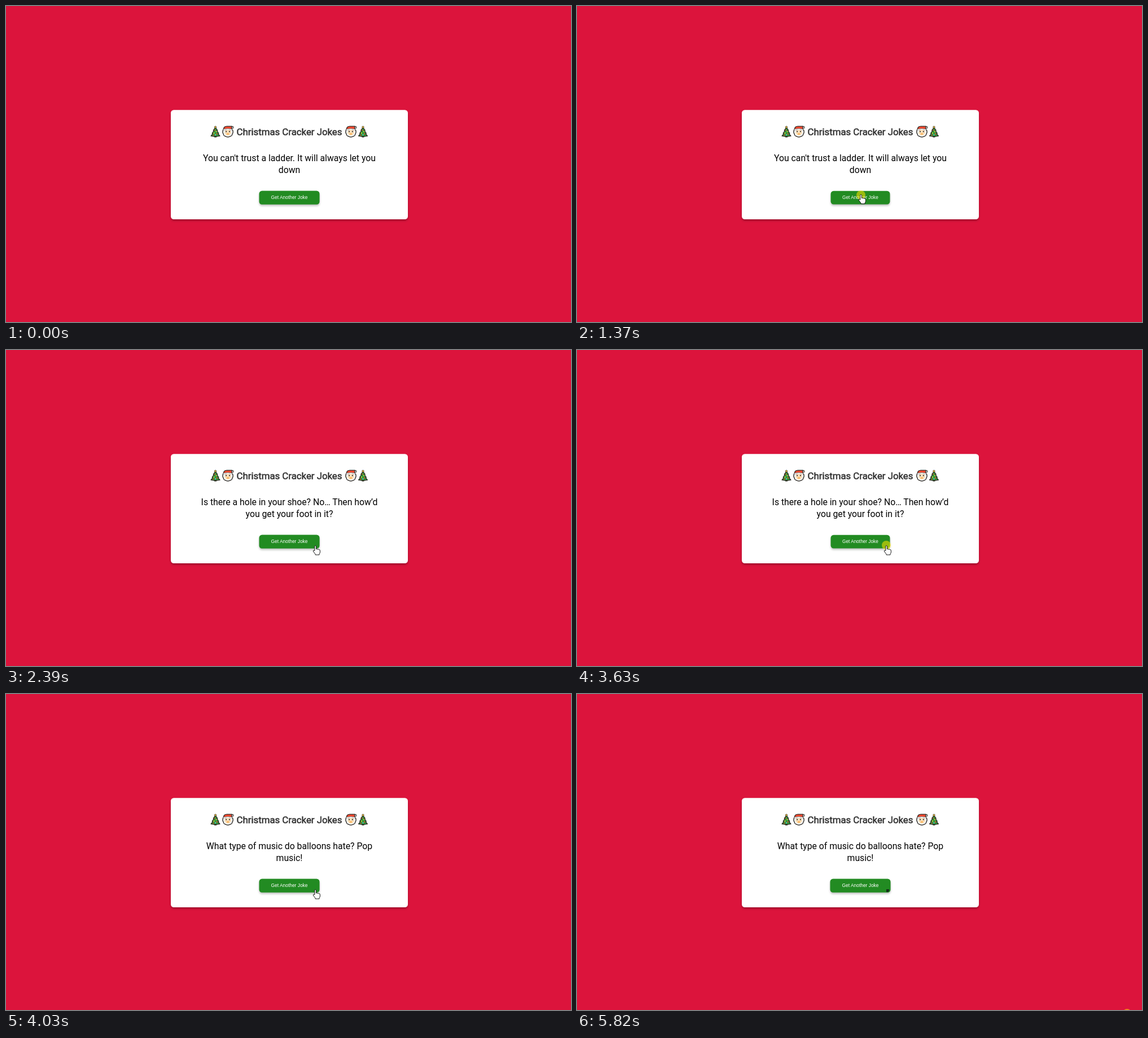
Recreate the animation shown at these times as an HTML page. Size 1001x560 px, loop 5.97 s.

```html
<!DOCTYPE html>
<html lang="en">
<head>
<meta charset="utf-8">
<title>Christmas Cracker Jokes</title>
<style>
html, body { margin: 0; width: 100%; height: 100%; overflow: hidden; background: #dc143c; }
#card {
  position: absolute; left: 502px; top: 280.8px; width: 800px; padding: 50px 0;
  box-sizing: border-box; border-radius: 10px; background: #fff;
  box-shadow: 0 5px 7px rgba(0,0,0,.28);
}
#title { display: block; width: 800px; height: 42.6px; overflow: visible; font: 32px Roboto, sans-serif; }
#joke { margin: 50px 0; font: 30px/40px Roboto, sans-serif; text-align: center; white-space: pre; color: #000; }
#button {
  width: fit-content; margin: 0 auto; padding: 14px 40px; border-radius: 10px;
  background: #228b22; color: #fff; font: 16px/18px "Liberation Sans", Arial, sans-serif;
  white-space: nowrap; box-shadow: 0 5px 7px rgba(0,0,0,.25);
}
#overlay { position: absolute; left: 0; top: 0; }
</style>
</head>
<body>
<div id="card">
  <svg id="title">
    <defs>
      <g id="tree" stroke="#2b2b22" stroke-width="2.6" stroke-linejoin="round">
        <path d="M-3 13H3V18H-3Z" fill="#8a5a2b"/>
        <path d="M0 -14L7 -4 5 -3 11 6 9 7 15 15Q0 18 -15 15L-9 7 -11 6 -5 -3 -7 -4Z" fill="#2f9a3a"/>
        <circle cy="-15" r="3.2" fill="#ffc83d" stroke-width="1.6"/>
        <g stroke="none">
          <circle cx="-2" cy="-5" r="2" fill="#e8452c"/><circle cx="3" cy="0" r="2" fill="#ffc83d"/>
          <circle cx="-5" cy="5" r="2" fill="#ffc83d"/><circle cx="5" cy="8" r="2.2" fill="#e8452c"/>
          <circle cx="-7" cy="12" r="2" fill="#e8452c"/><circle cx="0" cy="11" r="2" fill="#5cc8ee"/>
        </g>
      </g>
      <g id="santa" stroke="#33302c" stroke-width="2.8" stroke-linejoin="round">
        <path d="M-16 -6Q-19 3 -15 8 -14 15 -8 16 0 21 8 16 14 15 15 8 19 3 16 -6Z" fill="#fff"/>
        <ellipse cy="3" rx="12" ry="10" fill="#fde3c0" stroke="none"/>
        <path d="M-15 -7Q-14 -18 -3 -18H14L13 -7Q0 -11 -15 -7Z" fill="#f0482f"/>
        <path d="M-15 -6Q0 -10 14 -6" fill="none" stroke="#fff" stroke-width="3"/>
        <circle cx="16" cy="-14" r="3" fill="#fff" stroke-width="2"/>
        <g stroke="none">
          <circle cx="-5.5" cy="0" r="2.1" fill="#222"/><circle cx="5.5" cy="0" r="2.1" fill="#222"/>
          <ellipse cy="8" rx="5" ry="4" fill="#f9bd72"/>
        </g>
      </g>
    </defs>
    <use href="#tree" x="150.5" y="23"/><use href="#santa" x="192.5" y="23"/>
    <text x="400" y="34.8" text-anchor="middle" fill="#333" stroke="#333">Christmas Cracker Jokes</text>
    <use href="#santa" x="607.5" y="23"/><use href="#tree" x="648.5" y="23"/>
  </svg>
  <p id="joke"></p>
  <div id="button">Get Another Joke</div>
</div>
<svg id="overlay" width="1001" height="560">
  <path id="smudge" d="M548 346h5v3l-2 2h-3z" fill="#14301a"/>
  <circle id="click" r="8" fill="#ffe600" fill-opacity=".55"/>
  <path id="arrow" d="M0 0V12.5L2.9 9.8 4.8 14 6.9 13 5 9H9Z" fill="#fff" stroke="#000" stroke-width=".9"/>
  <path id="hand" d="M-1.2 9V.8C-1.2 -.6 1.4 -.6 1.4 .8V6Q2.7 5 4 6.3 5.4 5.6 6.5 6.8 8.4 6.4 8.4 8.4V11Q8.4 13 7 14.5V16H0V14.8L-3.5 10Q-4.2 8.2 -2.6 8 -1.8 8 -1.2 9Z" fill="#fff" stroke="#000" stroke-width=".9"/>
</svg>
<script>
const LOOP = 5970, STEP = 76.6, SCALE = 0.525;
const $ = id => document.getElementById(id);
const JOKES = [
  "You can't trust a ladder. It will always let you\ndown",
  "Is there a hole in your shoe? No… Then how’d\nyou get your foot in it?",
  "What type of music do balloons hate? Pop\nmusic!"
];
const between = (t, a, b) => t >= a && t < b;
const mix = (a, b, f) => a + (b - a) * f;
const easeOut = f => 1 - (1 - f) ** 2;
const easeInOut = f => f * f * (3 - 2 * f);
const stepAt = (t, start) => Math.floor((t - start) / STEP);

function pointer(t) {
  if (t < 220) return null;
  if (t < 756) {
    const f = easeOut(stepAt(t, 220) / 7);
    return ["arrow", mix(926, 511, f), mix(546, 337, f)];
  }
  if (t < 840) return ["hand", 511, 337];
  if (t < 1620) return ["hand", 503, 334.5];
  if (t < 1690) return ["arrow", 528, 342];
  if (t < 2320) return ["arrow", 546, 348];
  if (t < 2390) return ["hand", 548, 348];
  if (t < 4880) return ["hand", 548, 347];
  if (t < 5500) {
    const f = easeInOut(Math.min(1, (stepAt(t, 4880) + 1) / 8));
    return ["arrow", mix(548, 951, f), mix(347, 556, f)];
  }
  return null;
}

function clickSpot(t) {
  if (between(t, 1370, 1450)) return [503, 335];
  if (between(t, 3630, 3810)) return [548, 346];
  if (t >= 5820) return [974.5, 566];
  return null;
}

function place(id, spot) {
  $(id).style.display = spot ? "" : "none";
  if (spot) $(id).setAttribute("transform", `translate(${spot[0]} ${spot[1]})`);
}

function render(t) {
  const loading = between(t, 1450, 1770) || between(t, 3810, 4030);
  const pressed = between(t, 1370, 1450) || between(t, 3630, 3810);
  const text = loading ? "" : JOKES[t < 1450 ? 0 : t < 3810 ? 1 : 2];
  if ($("joke").textContent !== text) $("joke").textContent = text;
  $("card").style.transform = `translate(-50%, -50%) scale(${SCALE * (loading ? 0.7 : 1)})`;
  $("button").style.transform = pressed ? "scale(.98)" : "none";

  const p = pointer(t);
  for (const kind of ["arrow", "hand"]) place(kind, p && p[0] === kind ? p.slice(1) : null);
  place("click", clickSpot(t));
  $("smudge").style.display = t >= 4880 ? "" : "none";
}

const start = performance.now();
function tick() {
  render((performance.now() - start) % LOOP);
  requestAnimationFrame(tick);
}
tick();
</script>
</body>
</html>
```
